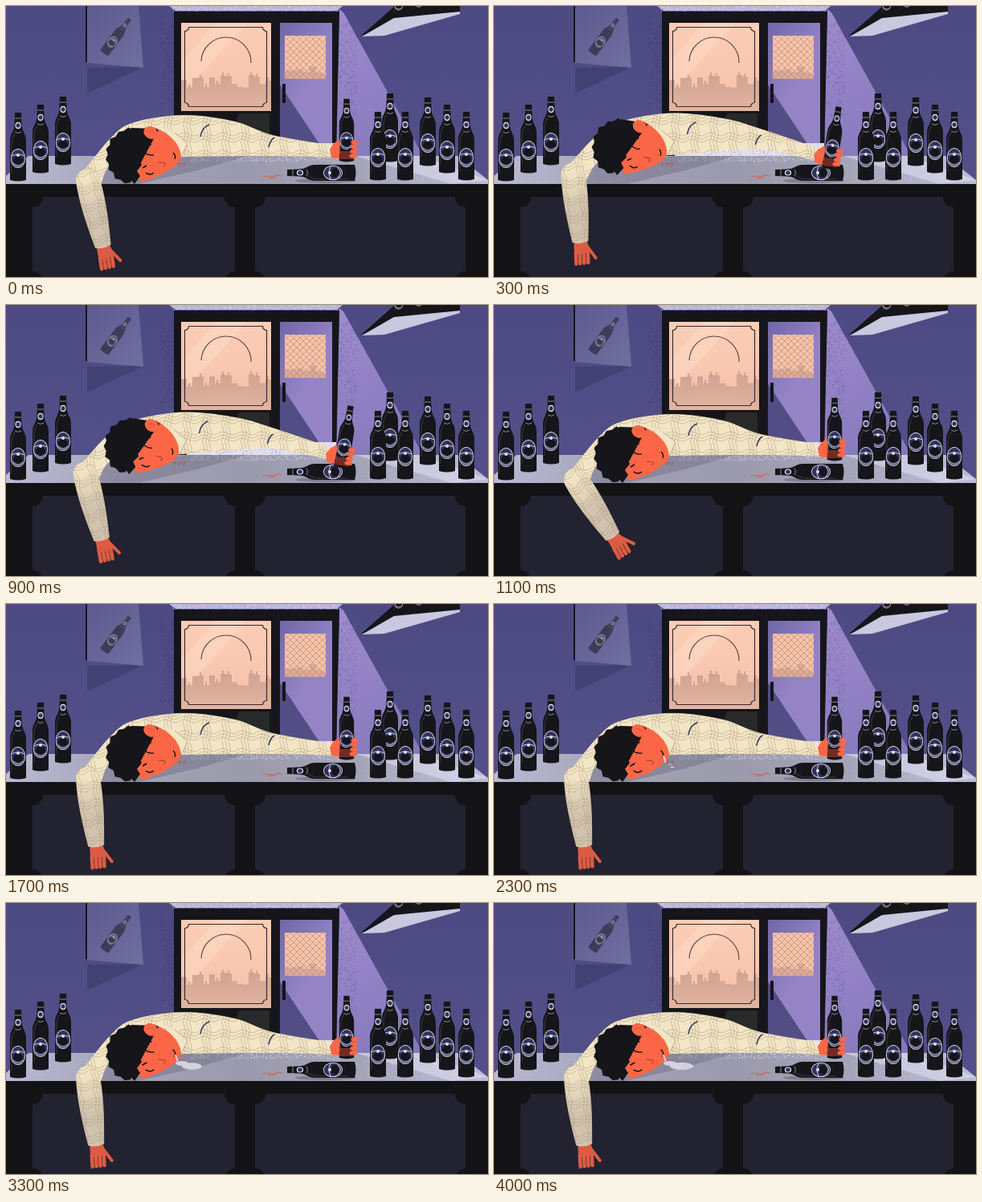
An HTML page with a canvas that plays this animation: 600x338 px, repeating every 4200 ms.

```html
<!DOCTYPE html>
<html lang="en">
<head>
<meta charset="utf-8">
<title>Last one at the bar</title>
<style>
html, body { margin: 0; width: 100%; height: 100%; overflow: hidden; background: #4f4c84; }
canvas { display: block; width: 100%; height: 100%; }
</style>
</head>
<body>
<canvas id="stage" width="600" height="338"></canvas>
<script>
const W = 600, H = 338, LOOP = 4200, STEP = 100;
const stage = document.getElementById('stage').getContext('2d');
const INK = '#15151a', SKIN = '#fb6746', HAND = '#dc5c43', CREAM = '#f3e6c5';
const NAVY = '#31335f', PALE = '#dedce8';

let seed = 7;
const rand = () => (seed = (seed * 16807) % 2147483647) / 2147483647;
const clamp = v => Math.max(0, Math.min(1, v));
const mix = (a, b, k) => a + (b - a) * k;
const ramp = (t, from, to) => clamp((t - from) / (to - from));
const ease = (t, from, to) => {
  const k = ramp(t, from, to);
  return k * k * (3 - 2 * k);
};

function layer(w, h, paint) {
  const c = document.createElement('canvas');
  c.width = w; c.height = h;
  paint(c.getContext('2d'));
  return c;
}
function poly(c, fill, ...p) {
  c.beginPath();
  for (let i = 0; i < p.length; i += 2) c.lineTo(p[i], p[i + 1]);
  c.closePath();
  c.fillStyle = fill;
  c.fill();
}
function rect(c, fill, x, y, w, h) { c.fillStyle = fill; c.fillRect(x, y, w, h); }
function oval(c, fill, x, y, rx, ry = rx, turn = 0) {
  c.beginPath();
  c.ellipse(x, y, rx, ry, turn, 0, Math.PI * 2);
  c.fillStyle = fill;
  c.fill();
}
function line(c, color, width, d) {
  c.strokeStyle = color; c.lineWidth = width;
  c.stroke(new Path2D(d));
}
function fade(c, x0, y0, x1, y1, ...colors) {
  const g = c.createLinearGradient(x0, y0, x1, y1);
  colors.forEach((color, i) => g.addColorStop(i / (colors.length - 1), color));
  return g;
}
function speckle(c, color, n, x, y, w, h) {
  for (let i = 0; i < n; i++) rect(c, color, x + rand() * w, y + rand() * h, .8, .8);
}
function posed(c, x, y, turn, paint) {
  c.save();
  c.translate(x, y);
  c.rotate(turn);
  paint();
  c.restore();
}
// Rectangle with corners scooped inward.
function scooped(x, y, w, h, r) {
  const s = `A${r} ${r} 0 0 0 `;
  return `M${x + r} ${y}H${x + w - r}${s}${x + w} ${y + r}V${y + h - r}${s}${x + w - r} ${y + h}` +
         `H${x + r}${s}${x} ${y + h - r}V${y + r}${s}${x + r} ${y}Z`;
}
// Smooth curve through the points, joined to the path by a straight line.
function spline(path, pts) {
  const p = i => pts[Math.max(0, Math.min(pts.length - 1, i))];
  path.lineTo(...pts[0]);
  for (let i = 0; i < pts.length - 1; i++) {
    const [a, b, d, e] = [p(i - 1), p(i), p(i + 1), p(i + 2)];
    path.bezierCurveTo(b[0] + (d[0] - a[0]) / 6, b[1] + (d[1] - a[1]) / 6,
      d[0] - (e[0] - b[0]) / 6, d[1] - (e[1] - b[1]) / 6, ...d);
  }
}

// Bottle standing on (x, y), 86 units tall.
function bottle(c, x, y, turn = 0, size = 1) {
  posed(c, x, y, turn, () => {
    c.scale(size, size);
    c.fillStyle = INK;
    c.fill(new Path2D('M-10 -1Q0 2 10 -1V-50C10 -59 5 -60 4.5 -70L4 -85H-4L-4.5 -70C-5 -60 -10 -59 -10 -50Z'));
    line(c, '#4b4644', .8, 'M-8 -10V-48Q-7 -55 -4 -59');
    oval(c, PALE, 0, -69, 3.6, 4.2);
    oval(c, NAVY, 0, -69, 2.5, 2.8);
    line(c, '#a9a7bb', .8, 'M-4 -61Q0 -58 4 -61M-4 -78H4');
    oval(c, PALE, 0, -28, 9.2, 12);
    oval(c, NAVY, 0, -28, 8.3, 11.1);
    line(c, PALE, .9, 'M-8 -31Q0 -35 8 -31M-6 -22Q0 -15 6 -22');
    oval(c, INK, 0, -25.5, 6, 5);
    oval(c, PALE, 0, -32, 2);
  });
}

function paintWindow(c) {
  rect(c, fade(c, 0, 21, 0, 131, '#fbcdb4', '#f9c8b0', '#f4bda6'), 218, 21, 112, 110);
  poly(c, 'rgba(255,226,205,.35)', 218, 70, 262, 21, 300, 21, 218, 112);
  for (let x = 218; x < 330; x += 7) {
    const h = 28 + rand() * 17, w = Math.min(7, 330 - x);
    rect(c, fade(c, 0, 85, 0, 131, '#cfa392', '#e3b5a1'), x, 131 - h, w, h);
    if (rand() > .7) rect(c, '#cfa392', x + 2, 127 - h, 2, 5);
  }
  line(c, '#3a2a33', 1.2, scooped(222.5, 26.5, 102, 99, 5));
  line(c, '#5a4044', 1.1, 'M243 69A31 31 0 0 1 305 71');
}

function paintDoor(c) {
  rect(c, INK, 209, 7, 200, 180);
  poly(c, INK, 405, 7, 415, 7, 411, 187, 405, 187);
  poly(c, '#b8b5d8', 203, 0, 419, 0, 412, 6, 211, 6);
  speckle(c, '#eeeefa', 160, 207, 0, 205, 6);
  paintWindow(c);
  poly(c, '#272a28', 290, 134, 328, 134, 328, 165, 282, 156);
  rect(c, fade(c, 341, 21, 400, 60, '#7067a8', '#9484c6'), 341, 21, 65, 166);
  poly(c, '#524d84', 341, 98, 341, 187, 400, 187);
  rect(c, '#f6c3a8', 347, 37, 51, 54);
  c.save();
  c.beginPath(); c.rect(347, 37, 51, 54); c.clip();
  let mesh = '';
  for (let x = 290; x < 455; x += 8) {
    const h = 6 + rand() * 10;
    rect(c, '#dcaa96', x, 91 - h, 8, h);
    mesh += `M${x} 37l54 54M${x} 37l-54 54`;
  }
  line(c, '#b98b7d', .7, mesh);
  c.restore();
  rect(c, INK, 344, 97, 4, 24);
  rect(c, '#dfddec', 225, 171, 186, 17);
  speckle(c, '#ffffff', 400, 230, 171, 180, 16);
  speckle(c, '#77739f', 150, 230, 171, 180, 16);
}

function paintRoom(c) {
  rect(c, fade(c, 0, 0, 0, 187, '#4d4a83', '#524f89'), 0, 0, W, H);
  // Light falling in beside the door.
  poly(c, fade(c, 415, 20, 500, 190, '#9d8acc', '#8478bb'), 415, 4, 420, 8, 519, 187, 411, 187);
  speckle(c, '#3d3a70', 260, 192, 20, 17, 110);
  speckle(c, '#5d5897', 260, 415, 20, 22, 120);
  // Picture on the left wall.
  poly(c, '#434074', 101, 77, 171, 76, 101, 109);
  poly(c, fade(c, 101, 0, 171, 77, '#5d5a91', '#716e9f'), 101, 0, 165, 0, 171, 77, 101, 71);
  rect(c, INK, 99, 0, 2, 70);
  c.globalAlpha = .5;
  bottle(c, 122, 59, .64, .63);
  c.globalAlpha = 1;
  // Hanging shelf.
  poly(c, INK, 484, 0, 565, 0, 565, 8, 483, 22, 441, 38);
  bottle(c, 487, 15, .12, .6);
  bottle(c, 512, 11, .12, .6);
  poly(c, '#c9c8df', 443, 38, 483, 15, 565, 7, 565, 10, 471, 37);
  paintDoor(c);
}

function paintBar(c) {
  poly(c, fade(c, 0, 0, W, 0, '#b9bad4', '#a3a3b6', '#9b9aac', '#a6a6bb', '#bbbbd5'),
    28, 187, 562, 187, 600, 217, 600, 222, 0, 222, 0, 212);
  poly(c, 'rgba(235,234,250,.45)', 435, 187, 515, 187, 600, 217, 555, 222);
  speckle(c, '#e6e5f3', 260, 230, 187, 190, 7);
  speckle(c, '#d5d4e8', 180, 450, 188, 100, 30);
  rect(c, '#131316', 0, 222, W, 116);
  c.fillStyle = '#222230';
  c.fill(new Path2D(scooped(33, 238, 252, 106, 13)));
  c.fill(new Path2D(scooped(310, 238, 262, 106, 13)));
  // Each group runs from the back of the bar to its front edge.
  for (let i = 0; i < 3; i++) {
    bottle(c, 71 - 28 * i, 198 + 10 * i);
    bottle(c, 525 + 24 * i, 199 + 9 * i);
  }
  bottle(c, 478, 194);
  for (const x of [463, 497]) bottle(c, x, 217);
  c.lineCap = 'round';
  for (let i = 0; i < 3; i++) line(c, '#d9624b', 1.1, `M${207 + 6 * i} 197l4 -1 -2 4`);
  line(c, '#d9624b', 1.2, 'M320 213l7 -1 5 2 6 -3 5 1M326 215l8 -1');
  oval(c, 'rgba(60,58,85,.35)', 398, 218, 38, 3);
  bottle(c, 435, 208, -Math.PI / 2);
}

const backdrop = layer(W, H, c => { paintRoom(c); paintBar(c); });
const plaid = stage.createPattern(layer(24, 22, c => {
  for (let k = 2; k < 14; k += 4) {
    line(c, 'rgba(140,122,98,.36)', 1, `M0 ${k + 4}Q6 ${k} 12 ${k + 4}T24 ${k + 4}`);
    line(c, 'rgba(140,122,98,.36)', 1, `M${k + 4} 0Q${k + 7} 6 ${k + 4} 11T${k + 4} 22`);
  }
}), 'repeat');

// Key points of the shirt as [slumped, raised], from elbow to cuff and back again.
const BELLY = [
  [[118, 222], [112, 212]], [[140, 192], [138, 188]], [[228, 188], [214, 184]],
  [[330, 187], [325, 171]], [[408, 189], [391, 196]]];
const BACK = [
  [[408, 174], [402, 182]], [[332, 161], [337, 147]], [[285, 144], [290, 137]],
  [[222, 136], [225, 131]], [[160, 145], [160, 142]], [[130, 165], [118, 165]], [[88, 217], [78, 206]]];

function torso(k) {
  const path = new Path2D();
  for (const side of [BELLY, BACK])
    spline(path, side.map(([a, b]) => [mix(a[0], b[0], k), mix(a[1], b[1], k)]));
  path.closePath();
  return path;
}
function cloth(c, path, color) {
  for (const fill of [color, plaid]) { c.fillStyle = fill; c.fill(path); }
}

const SLEEVE = new Path2D('M-15 0A15 15 0 0 1 15 0C17 30 13 60 10 84Q0 88 -10 84C-13 60 -17 30 -15 0Z');

function looseArm(c, k, degrees) {
  posed(c, mix(102, 95, k), mix(218, 203, k), -degrees * Math.PI / 180, () => {
    c.lineCap = 'round';
    poly(c, HAND, -8, 82, 8, 82, 11, 98, -9, 100);
    for (let x = -7; x < 10; x += 5) line(c, HAND, 4.5, `M${x} 97L${x - 1} 111`);
    line(c, HAND, 4, 'M8 91L17 106');
    cloth(c, SLEEVE, fade(c, 0, -5, 0, 45, CREAM, '#d2c3ae'));
  });
}

const FACE = new Path2D('M160 165L184 151C203 158 217 172 218 188C216 200 190 214 170 219L152 205Z');
// Rounded crop with ragged tufts, closed by the fringe.
const hair = new Path2D('M190 154');
for (let i = 0; i <= 18; i++) {
  const angle = -Math.PI * (.38 + i * .06), r = 32 + (i % 2) * 3 + rand() * 2;
  hair.lineTo(159 + r * Math.cos(angle), 187 + r * Math.sin(angle));
}
hair.addPath(new Path2D('M188 153L156 152 130 190 160 222 167 212 163 206 169 198 164 190 172 178 171 166Z'));

function head(c, k) {
  posed(c, 215 - 5 * k, 185 - 7 * k, k * .26, () => {
    c.translate(-215, -185);
    c.fillStyle = SKIN; c.fill(FACE);
    c.fillStyle = INK; c.fill(hair);
    oval(c, SKIN, 180, 158, 9, 7.5, .5);
    line(c, '#d44f38', .9, 'M176 157Q181 153 185 159');
    line(c, INK, 1.4, 'M171 181Q176 187 184 186M174 208Q179 212 184 208M208 183Q212 187 210 191');
    line(c, INK, 1.6, 'M172 174L181 173M170 202L175 199');
    line(c, '#a83528', 1, 'M190 195L198 196Q200 199 196 200');
  });
}

function drool(c, t) {
  const run = ramp(t, 1900, 2400), pool = ramp(t, 2200, 2800), rest = ramp(t, 2800, 3700);
  if (!run) return;
  const wet = '#d3d3df';
  c.lineCap = 'round';
  line(c, wet, 2, `M211 190Q${211 + 2 * run} ${190 + 4 * run} ${211 + 3 * run} ${190 + 9 * run}`);
  if (!pool) return;
  oval(c, wet, 219, 200, 2 + 6 * pool, 3 * pool);
  const reach = 1.5 + 8 * pool + 5 * rest;
  oval(c, wet, 219 + reach, 203.5, reach, 4 * pool + .6 * rest);
}

function grip(c, k) {
  const x = mix(424, 410, k), y = mix(194, 212, k), turn = k * .31;
  posed(c, x, y, turn, () => poly(c, SKIN, -21, -15, -17, -22, -10, -27, 10, -25, 13, -5, -8, -3, -19, -5));
  bottle(c, x, y, turn, .92);
  posed(c, x, y, turn, () => {
    rect(c, 'rgba(190,62,42,.55)', -9, -13, 18, 10);
    for (let i = 0; i < 4; i++) oval(c, SKIN, 10 - i * .7, -24 + i * 5.6, 4.5, 2.7, -.15);
    poly(c, SKIN, -18, -20, -10, -27, -8, -22, -9, -9, -16, -6);
  });
}

function draw(t) {
  const c = stage;
  const lift = ease(t, 0, 600) - ease(t, 700, 1100);
  const swing = 13 - 17.5 * ease(t, 0, 700) + 37.5 * ease(t, 700, 1100) - 26 * ease(t, 1100, 1700);
  c.drawImage(backdrop, 0, 0);
  poly(c, 'rgba(75,73,98,.28)', 120, 197, 230, 187, 300, 187, 238, 205, 165, 222, 112, 222);
  const body = torso(lift);
  cloth(c, body, CREAM);
  looseArm(c, lift, swing);
  posed(c, -3 * lift, -6 * lift, 0, () => {
    line(c, NAVY, 1.5, 'M242 163Q244 151 253 148M327 176Q329 167 334 164');
    poly(c, CREAM, 196, 152, 210, 158, 226, 171, 218, 189, 210, 172);
    line(c, '#9c917f', .7, 'M210 158L226 171 218 189');
  });
  head(c, lift);
  drool(c, t);
  grip(c, lift);
}

const start = performance.now();
function tick() {
  const t = Math.max(0, performance.now() - start) % LOOP;
  draw(Math.floor(t / STEP) * STEP);
  requestAnimationFrame(tick);
}
tick();
</script>
</body>
</html>
```
